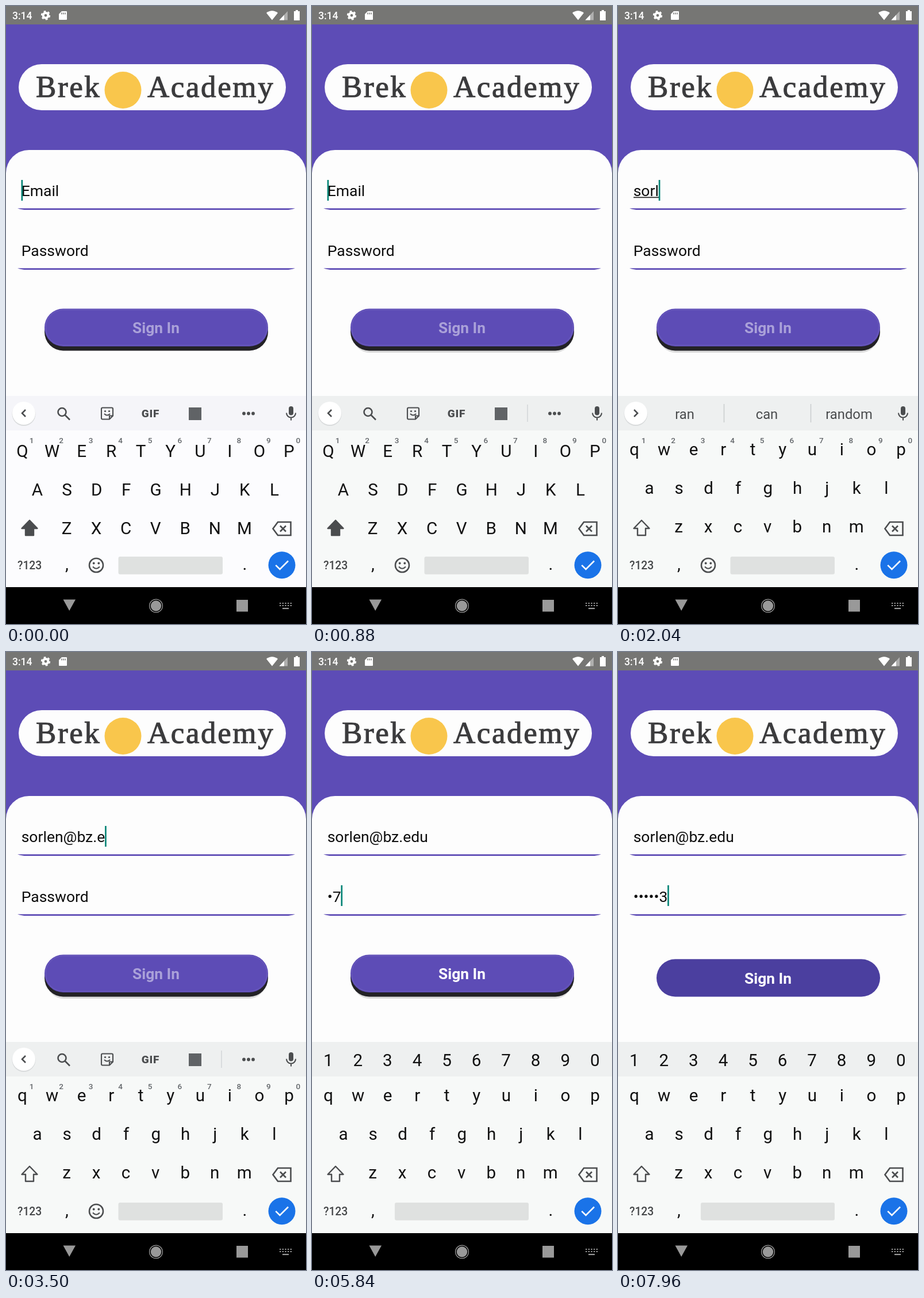
An HTML page for the animation above (8 s loop, 522x1073 px).

```html
<!DOCTYPE html>
<html lang="en">
<head>
<meta charset="utf-8">
<title>Sign in</title>
<style>
  html, body { margin: 0; width: 100%; height: 100%; overflow: hidden; background: #000; }
  svg { display: block; width: 522px; height: 1073px; font-family: Roboto, "Noto Sans", sans-serif; }
  .field { font-size: 26.5px; fill: #0d0d0d; }
  .key { font-size: 29.6px; fill: #111; text-anchor: middle; }
  .hint { font-size: 13.5px; font-weight: 500; fill: #62666a; text-anchor: middle; }
  .word { font-size: 23.8px; fill: #4a4c4e; text-anchor: middle; }
  .brand { font: 53px "Liberation Serif", serif; letter-spacing: 2.6px; fill: #3b3b3d; stroke: #3b3b3d; stroke-width: 1.1; }
  .sign { font-size: 26.4px; font-weight: 700; fill: #fff; text-anchor: middle; }
  .line { fill: none; stroke: #4b4d4f; stroke-width: 2.6; }
  .thin { stroke-width: 2.1; }
  .icon { fill: #4b4d4f; }
</style>
</head>
<body>
<svg viewBox="0 0 522 1073">
  <rect width="522" height="300" fill="#5d4cb6"/>
  <rect width="522" height="32" fill="#767674"/>

  <!-- status bar -->
  <g fill="#fff">
    <text x="11" y="22.5" font-size="17.5" font-weight="500">3:14</text>
    <circle cx="69" cy="16.3" r="4.4" fill="none" stroke="#fff" stroke-width="4"/>
    <circle cx="69" cy="16.3" r="6.9" fill="none" stroke="#fff" stroke-width="2.6" stroke-dasharray="3.6 3.625"/>
    <path d="M97 9h8q1 0 1 1v13q0 1-1 1H93q-1 0-1-1V14z"/>
    <path d="M97 11.5v3M100 11.5v3M103 11.5v3" stroke="#767674" stroke-width="1.5"/>
    <path d="M453 12Q463 4.5 473 12L463 24.5z"/>
    <path d="M490 9v15.5H475.5z" opacity=".42"/>
    <path d="M484 15.5v9H475.5z"/>
    <path d="M504 7h4v2h3v16h-10V9h3z"/>
  </g>

  <!-- brand -->
  <rect x="22" y="101" width="465" height="80" rx="40" fill="#fdfdfd"/>
  <text class="brand" x="52" y="158">Brek</text>
  <text class="brand" x="246" y="158">Academy</text>
  <circle cx="203.5" cy="146" r="32" fill="#f9c64c"/>

  <!-- form -->
  <path d="M0 290a40 40 0 0 1 40-40H482a40 40 0 0 1 40 40V680H0z" fill="#fdfdfd"/>
  <g id="rules" fill="#5d4bb5"></g>
  <text id="email" class="field" x="26.7" y="330.3"></text>
  <text id="pass" class="field" x="26.7" y="434.3"></text>
  <rect id="compose" x="27" y="331.5" height="1.7" fill="#222"/>
  <rect id="caret" width="2.7" height="36" fill="#078577"/>

  <g id="raised">
    <rect id="shade" x="70" y="540" width="383" height="62" rx="31" fill="#dcdcdc"/>
    <rect x="67" y="533" width="389" height="65.5" rx="32.5" fill="#232226"/>
    <rect x="67" y="525.5" width="389" height="65.5" rx="32.5" fill="#5d4cb6"/>
    <rect x="69" y="527.5" width="385" height="61.5" rx="30.5" fill="none" stroke="#fff" stroke-opacity=".1"/>
  </g>
  <rect id="pressed" x="67" y="533.3" width="389" height="65.3" rx="32.6" fill="#4b3f9f"/>
  <text id="sign" class="sign" x="261">Sign In</text>

  <!-- keyboard -->
  <rect id="board" y="737" width="522" height="272"/>
  <rect id="strip" y="677" width="522" height="60"/>
  <text x="20" y="978.3" font-size="19.3" font-weight="500" fill="#444648">?123</text>
  <text class="key" x="106" y="979">,</text>
  <text class="key" x="415.5" y="979">.</text>
  <path class="line" d="M473 896H495.5V919H473L464.5 907.5zM477 902.5l10 10M487 902.5l-10 10"/>
  <circle cx="480" cy="970.7" r="23.5" fill="#1a73e8"/>
  <path d="M469.3 970.8l7.2 7.2L491 963.5" fill="none" stroke="#fff" stroke-width="2.6"/>
  <rect id="space" y="956" height="30.7" rx="3" fill="#dfe1e0"/>
  <path id="shift" d="M41 893L54.5 907H48V919H34V907H27.5z" stroke="#4b4d4f" stroke-width="2.4" stroke-linejoin="round"/>
  <g id="smile">
    <circle class="line" cx="157" cy="971" r="12"/>
    <circle class="icon" cx="152.7" cy="967.5" r="1.9"/>
    <circle class="icon" cx="161.3" cy="967.5" r="1.9"/>
    <path class="line thin" d="M151 973.5q6 6.500 12 0"/>
  </g>
  <g id="upper"></g>
  <g id="lower"></g>
  <g id="digits"></g>
  <g id="hints"></g>

  <g id="top">
    <circle cx="31" cy="708.5" r="20.5" fill="#d9dbdc"/>
    <circle cx="31" cy="707" r="20" fill="#fff"/>
    <path id="chevron" class="line"/>
    <rect class="icon" x="492" y="695" width="8" height="15.5" rx="4"/>
    <path class="line thin" d="M488 706.5a8 8 0 0 0 16 0M496 714.5v5"/>
  </g>
  <g id="tools">
    <circle class="line" cx="97.5" cy="705" r="7"/>
    <path class="line" d="M102.5 710l8.5 8.5"/>
    <path class="line thin" d="M168 697.5h16q2 0 2 2v12l-6 6h-12q-2 0-2-2v-16q0-2 2-2zM186 711.5h-6v6"/>
    <circle class="icon" cx="172.5" cy="703.5" r="1.6"/>
    <circle class="icon" cx="179.5" cy="703.5" r="1.6"/>
    <path class="line thin" d="M171 708q5 5 10 0"/>
    <text class="icon" x="251.4" y="714" text-anchor="middle" font-size="19" font-weight="900" letter-spacing=".7">GIF</text>
    <rect x="318" y="697" width="22" height="22" fill="#606366"/>
    <path id="split" d="M375 692v30" stroke="#d2d6d9" stroke-width="1.5"/>
    <g class="icon">
      <circle cx="414" cy="707.5" r="2.9"/><circle cx="422" cy="707.5" r="2.9"/><circle cx="430" cy="707.5" r="2.9"/>
    </g>
  </g>
  <g id="words">
    <text class="word" x="116" y="717">ran</text>
    <text class="word" x="259" y="717">can</text>
    <text class="word" x="402" y="717">random</text>
    <path d="M184.5 691v32M335.5 691v32" stroke="#c9cccd" stroke-width="1.5"/>
  </g>

  <!-- navigation bar -->
  <rect y="1009" width="522" height="64"/>
  <g fill="#999">
    <path d="M99.5 1030.5h21.5L110.2 1050z"/>
    <circle cx="261" cy="1041.5" r="9.2"/>
    <circle cx="261" cy="1041.5" r="11.4" fill="none" stroke="#999" stroke-width="1.3"/>
    <rect x="401" y="1031" width="20" height="20.5"/>
    <path d="M476 1037h21M476 1041h21" stroke="#999" stroke-width="2.2" stroke-dasharray="2.4 2.25"/>
    <path d="M481 1046h11" stroke="#999" stroke-width="2.2"/>
  </g>
</svg>
<script>
const LOOP = 8000;
const EMAIL = 'sorlen@bz.edu', CODE = '472913';
const emailKeys = [1380, 1580, 1790, 2000, 2200, 2400, 2680, 2880, 3060, 3270, 3450, 3660, 3860];
const passKeys = [5420, 5700, 6080, 6350, 6620, 6890];
const FOCUS = 4700, PRESS = 7850, SETTLE = 40;
const BLINK = 500, REVEAL = 1500, PITCH = 51.55;

const ui = {};
document.querySelectorAll('[id]').forEach(el => ui[el.id] = el);

function set(el, attrs) {
  for (const name in attrs) el.setAttribute(name, attrs[name]);
}
function show(el, on) {
  el.style.display = on ? '' : 'none';
}
function add(parent, tag, attrs, text = '') {
  const el = document.createElementNS('http://www.w3.org/2000/svg', tag);
  set(el, attrs);
  el.textContent = text;
  parent.append(el);
}
function row(parent, chars, x, y, cls = 'key') {
  [...chars].forEach((c, i) => add(parent, 'text', { x: x + i * PITCH, y, class: cls }, c));
}

[['qwertyuiop', 28.5, 780], ['asdfghjkl', 54.5, 847], ['zxcvbnm', 105.5, 914]].forEach(([chars, x, y]) => {
  row(ui.lower, chars, x, y);
  row(ui.upper, chars.toUpperCase(), x, y + 3);
});
row(ui.digits, '1234567890', 28.3, 719);
row(ui.hints, '1234567890', 44.5, 759, 'hint');
for (const y of [351.3, 455.3]) {
  add(ui.rules, 'path', { d: `M20 ${y}Q27 ${y + 2.8} 36 ${y + 2.8}H487Q496 ${y + 2.8} 503 ${y}z` });
}

const typed = (keys, t) => keys.filter(k => k <= t).length;

function passText(n, t) {
  if (!n) return 'Password';
  const open = t - passKeys[n - 1] < REVEAL;
  return '•'.repeat(n - 1) + (open ? CODE[n - 1] : '•');
}

function caretOn(t) {
  const last = [...emailKeys, FOCUS, ...passKeys].filter(k => k <= t).pop();
  if (last === undefined) return t < 900;
  return (t - last) % (2 * BLINK) < BLINK;
}

function draw(t) {
  const n = typed(emailKeys, t), p = typed(passKeys, t);
  const inPass = t >= FOCUS, down = t >= PRESS, pale = t < SETTLE;
  const composing = n > 0 && n < 7;
  const caps = n === 0;

  ui.email.textContent = n ? EMAIL.slice(0, n) : 'Email';
  ui.pass.textContent = passText(p, t);

  const field = inPass ? ui.pass : ui.email;
  const width = (inPass ? p : n) ? field.getComputedTextLength() : 0;
  set(ui.caret, { x: 26.5 + width, y: inPass ? 405 : 302 });
  show(ui.caret, caretOn(t));
  set(ui.compose, { width });
  show(ui.compose, composing);

  show(ui.raised, !down);
  show(ui.pressed, down);
  show(ui.shade, !pale);
  set(ui.sign, { y: down ? 576 : 568, 'fill-opacity': p ? 1 : .48 });

  set(ui.board, { fill: pale ? '#fcfcfe' : '#f7f9f8' });
  set(ui.strip, { fill: pale ? '#f5f5f9' : '#eef0f0' });
  show(ui.split, !pale);
  show(ui.upper, caps);
  show(ui.lower, !caps);
  set(ui.shift, { fill: caps ? '#4b4d4f' : 'none' });
  show(ui.hints, !inPass);
  show(ui.digits, inPass);
  show(ui.smile, !inPass);
  set(ui.space, inPass ? { x: 144, width: 233 } : { x: 195.5, width: 181.5 });
  show(ui.top, !inPass);
  show(ui.tools, !inPass && !composing);
  show(ui.words, composing);
  set(ui.chevron, { d: composing ? 'M28 701l6 6-6 6' : 'M34 701l-6 6 6 6' });
}

const start = performance.now();
function tick() {
  draw((performance.now() - start) % LOOP);
  requestAnimationFrame(tick);
}
tick();
</script>
</body>
</html>
```
